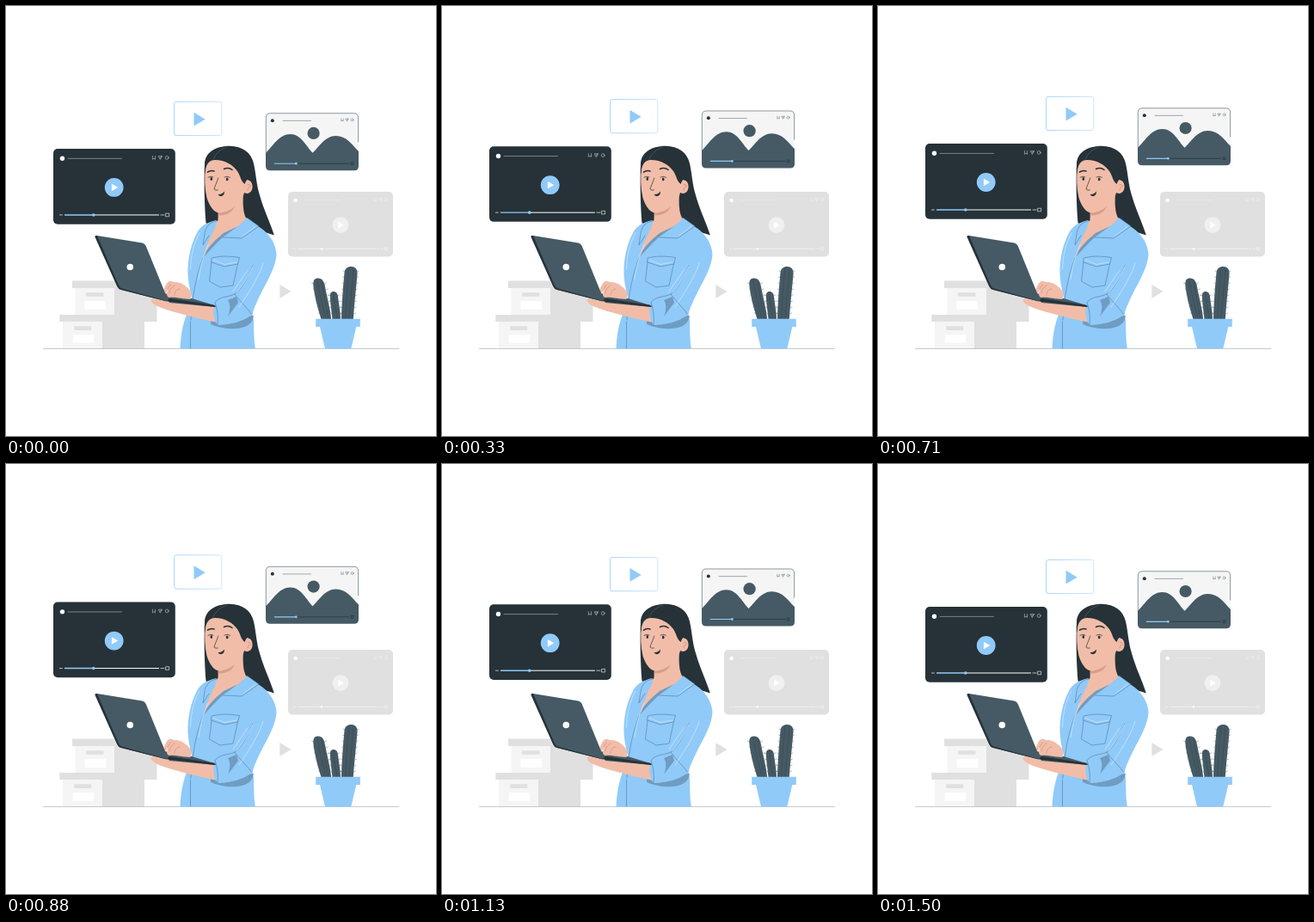
These frames come from a looping animation (500x500 px, 1.54 s). An HTML page:

```html
<!DOCTYPE html>
<html lang="en">
<head>
<meta charset="utf-8">
<title>Floating video cards</title>
<style>
html, body { margin: 0; width: 100%; height: 100%; overflow: hidden; background: #fff; }
svg { display: block; width: 100vw; height: 100vh; }
.ink { fill: #263238; }
.slate { fill: #455a64; }
.sky { fill: #90caf9; }
.grey { fill: #e0e0e0; }
.pale { fill: #f5f5f5; }
.white { fill: #fff; }
.skin { fill: #f1bda8; }
.blush { fill: #d99c88; }
.shade { fill: #6f9cc0; }
.line { fill: none; stroke-linecap: round; stroke-linejoin: round; }
.seam { stroke: #4a7396; stroke-width: .55; }
.crease { stroke: #d3eafd; stroke-width: .7; }
.dark { stroke: #263238; }
.light { stroke: #fff; }
.blue { stroke: #90caf9; }
</style>
</head>
<body>
<svg viewBox="0 0 500 500" stroke-width=".7">
  <defs>
    <linearGradient id="edge" x2="1">
      <stop offset="0" stop-color="#90caf9"/>
      <stop offset="1" stop-color="#c0e0fb"/>
    </linearGradient>
    <g id="icons" class="line" stroke-width=".6">
      <path d="M-1.6-1.9V1.9L0 .8 1.6 1.9V-1.9M5.6-1.7H9.4L7.5 1.8ZM7.5 0 9.4-1.7"/>
      <circle cx="15.2" r="1.9"/>
    </g>
  </defs>

  <!-- grey card and small arrow -->
  <rect class="grey" x="328" y="216" width="122" height="75.5" rx="5"/>
  <circle class="white" cx="336.7" cy="226" r="2.3"/>
  <path class="line" stroke="#ececec" d="M348 225.7H387"/>
  <use href="#icons" stroke="#f3f3f3" transform="translate(429.5 225.2) scale(.82)"/>
  <circle class="pale" cx="389" cy="254.7" r="9.4" opacity=".75"/>
  <path class="white" d="M386.3 250.8V258.6L392.5 254.7Z"/>
  <path class="line" stroke="#f4f4f4" d="M334.5 282.4H336.5M339 282.4H433.5M436 282.4H438.5M441 281H443.5V283.8H441Z"/>
  <circle class="white" cx="367" cy="282.4" r="1.2"/>
  <path class="grey" d="M318.3 324V340L331.5 332Z"/>

  <!-- boxes -->
  <path class="grey" d="M126 328H175.5V359H126ZM77 319.5H178V328H77ZM112 367H161V398.5H112ZM62.3 359H175.5V367H62.3Z"/>
  <path class="pale" d="M80.5 328H126V359H80.5ZM66 367H112V398.5H66Z"/>
  <rect class="grey" x="93" y="333.3" width="20.5" height="4.5" rx="1"/>
  <rect class="grey" x="79.3" y="372.3" width="20" height="4.7" rx="1"/>
  <path class="white" d="M91.5 343H116V353H91.5ZM77.8 382.3H102V391.7H77.8Z"/>

  <path class="line" stroke="#aeb4b7" d="M43.5 398.5H456.5"/>

  <!-- cactus -->
  <g id="cactus">
    <path class="slate" d="M366.5 364C362 350 358.5 336 357.4 325C356.8 319 359 316.3 363 316.6C367.5 317 369.8 320 370.7 325C373 338 377 351 378.2 364Z"/>
    <path class="slate" d="M379.5 364C378.5 354 377 345 376.8 337C376.8 333.5 378.5 331.8 381.2 332C384.5 332.3 385.7 335 386 338C387 347 389 356 389 364Z"/>
    <path class="slate" d="M390 364C390.5 345 392 326 393.5 310C394.2 305 397 303 401.5 303C406.5 303 409 306.5 408.5 312C407 330 404.8 348 403.8 364Z"/>
    <path class="line" stroke="#37474f" stroke-width=".5" d="M362 318C364 334 369 350 372 364M367 318C368 335 373 350 375 364M381 333C381 345 384 356 385 364M399 304C397 325 395 345 395 364M404 304C403 325 400 345 399 364"/>
  </g>
  <path class="sky" d="M360.2 363.7H411.8V373H360.2ZM365 373H407.3L401.3 398.5H371Z"/>

  <!-- hair behind -->
  <path class="ink" d="M231 184C231 171 243 162.8 260 162.7C275 163 285 170 288 183C291 197 291 207 295 220C300 238 307 251 311.8 266.5C300 262 285 260 273 252L247 249C242 254 237 254 232.5 252.5C231 235 230 207 231 184Z"/>

  <!-- neck and face -->
  <path class="skin" d="M247 234L276 217C275 232 276 244 281 249L265 268L246 262Z"/>
  <path class="blush" d="M247 240C257 239 263 235 267 231C264 240 256 244 246.5 243.5Z"/>
  <path class="skin" d="M232 188C234 180 241 175 248 176C260 174 270 181 276 203C279 201 286 202 286.5 209C287 216 282 220 277 217C274 230 260 240 248 240.7C241 240 236 231 233.5 223C231 212 230.5 199 232 188Z"/>
  <path class="ink" d="M231.3 196C232 184 236 179 243 179C255 179 264 185 269 192C273 198 273 204 277.8 207C279 201 283 199 287 205C286 181 279 165 260 163C240 164 229 174 231.3 196Z"/>
  <path class="line" stroke="#64737a" stroke-width=".5" d="M241 178C244 171 250 166 257 164"/>
  <path class="line dark" stroke-width="1.6" d="M234.5 193.2Q238 190.5 242 192M253.5 189.5Q259 187.2 263 190.5"/>
  <ellipse class="ink" cx="238.8" cy="201" rx="1.3" ry="1.9"/>
  <ellipse class="ink" cx="257.2" cy="201.4" rx="1.3" ry="1.9"/>
  <path class="line dark" d="M235 199.2Q238 197.2 241 199M254 199Q257 197.2 260.5 199.2M246.8 200C245 206 242.5 210 242 213Q243.7 215 246.3 214"/>
  <path class="ink" d="M246.5 219Q251.5 219 254 215.4Q254 221 249.5 221.2Q247.5 220.8 246.5 219Z"/>
  <path class="line" stroke="#b56d5d" stroke-width=".5" d="M281 208Q284 206 284 210Q281 211 281 214"/>

  <!-- shirt -->
  <path class="sky" d="M246 250C237 250 228 254 223 262C215 276 211 294 211.5 312C212 325 216 337 217 345C209 358 204 372 202.5 398.5H290C288 388 288.5 380 288 365C285 360 288 352 291 346C300 325 314 306 314.5 288C313 273 304 262 290 254L281 247L262 262Z"/>
  <path class="skin" d="M245.5 250L262 247L270 256C258 263 242 277 229 292C233 278 240 266 245.5 250Z"/>
  <path class="shade" d="M270 256L252 269C243 277 235 286 229 293C233 282 242 273 253 264Z"/>
  <path class="sky" d="M280 246L294 256L274 270L252 269C263 262 274 256 280 246Z"/>
  <path class="sky" d="M245 249C238 250 233 253 229 262L226 278L243 259Z"/>
  <path class="line seam" d="M280 246L294 256L274 270L252 269M245 250C238 251 233 255 231 264L229 278L236 267M229 293C222 312 217 332 215 365"/>
  <path class="line crease" d="M276 267L290 256.5M225 264C218 276 215 290 214.5 306M235 278C231 288 226 300 224 318"/>
  <path class="line seam" d="M239.5 293C250 290 262 291 271.5 292.5L269.5 300L254 303L239 298ZM239 298L236.5 320L249 327L264 325L269.5 300"/>
  <path class="line crease" d="M241 295.2L254 300.5L268 298"/>

  <!-- shadow below the arm -->
  <path class="shade" d="M238 366L288 360C287 369 280 374 268 375C258 376 247 374 238 370Z"/>
  <path class="line seam" d="M214.5 367V398"/>

  <!-- forearm and cuff -->
  <path class="skin" d="M168.5 341C174 339 181 343 192 344L245 349L244 367.5C222 363 193 356 177 349.5C171 347 169 345 168.5 341Z"/>
  <path class="sky" d="M243 345C247 338 256 338 263 336C275 330 279 315 287 303L307 312C297 329 290 344 285 359C279 366 260 371 246 371C240 363 241 352 243 345Z"/>
  <path class="shade" d="M268 338L270 345L258 361C261 354 261 346 258 342Z"/>
  <path class="line seam" d="M287 302C281 314 276 328 266 335C258 339 248 337 243 345C246 353 247 363 246 371M266 335C273 345 281 351 285 358"/>
  <path class="line crease" d="M287 303C280 317 274 327 268 333M299 299C294 316 281 335 271 350M281 307L264 332"/>

  <!-- laptop and hand -->
  <path class="slate" d="M188 342L184 334L216 340L244 348.5L243.5 350L190 345Z"/>
  <path class="skin" d="M183 331C185 326 187 321 190 320C193 319 195 322 198 321C206 322 213 328 215.5 334L214.5 341C206 341 196 338 190 339C186 338 187 334 188 330L185 335Q182 334 183 331Z"/>
  <path class="line" stroke="#c27c69" stroke-width=".5" d="M190 334C190 329 194 326 196 325M196 336C196 332 199 329 202 329M188 329L191 324"/>
  <path class="slate" d="M106 267L158.5 275.4Q161.5 276 162.7 279L188 341Q189 344 186 343.2L134 330Q130.5 329 129.3 326L103.8 269Q102.6 266.4 106 267Z"/>
  <path class="ink" d="M103.8 269L129.3 326Q130.5 329 134 330L186 343.2L243.5 350L242 347.7L190 340L187 343L135 328.5Q132 328 131 325L106 267Q103 266.5 103.8 269Z"/>
  <circle class="white" cx="144.3" cy="303.5" r="3.8"/>

  <g id="cards">
    <!-- dark player -->
    <rect class="ink" x="55" y="166" width="141.8" height="87.7" rx="5"/>
    <circle class="white" cx="65.5" cy="177.3" r="2.7"/>
    <path class="line" stroke="#9da4a7" d="M72 177.4H134.5"/>
    <use href="#icons" stroke="#c8cdd0" x="172" y="176.4"/>
    <circle class="sky" cx="125.7" cy="211" r="10.9"/>
    <path class="white" d="M122.9 206.8V215.2L130.3 211Z"/>
    <path class="line light" stroke-width="1" d="M102 243H177.5"/>
    <path class="line blue" stroke-width="1.4" d="M68.5 243H102"/>
    <circle class="sky" cx="101.8" cy="243" r="1.8"/>
    <path class="line" stroke="#bcc3c6" stroke-width="1" stroke-dasharray="1 .8" d="M62.5 243H66M180 243H184"/>
    <path class="line light" stroke-width=".6" d="M186 241.2H189.6V244.8H186Z"/>

    <!-- outlined card -->
    <rect x="195.6" y="111.4" width="55.2" height="39.2" rx="2.5" fill="#fff" stroke="url(#edge)" stroke-width=".8"/>
    <path class="sky" d="M218.5 123.8V139.6L231.7 131.7Z"/>

    <!-- landscape card -->
    <rect class="pale" x="302" y="124.5" width="107.9" height="66.8" rx="5"/>
    <path class="line" stroke="#455a64" stroke-width=".6" d="M302.3 171V129.8Q302.3 124.8 307.3 124.8H404.6Q409.6 124.8 409.6 129.8V158"/>
    <path class="slate" d="M302 171C311 162 318 149 330.5 149C343 149 349 163 356.5 170.8C364 164 371 151 383.5 151C396 151 402 161 410 169V186.3Q410 191.3 405 191.3H307Q302 191.3 302 186.3Z"/>
    <circle class="slate" cx="357.6" cy="148" r="7.1"/>
    <circle class="ink" cx="309.8" cy="133.2" r="2"/>
    <path class="line" stroke="#7b898f" d="M322 133.4H354.5"/>
    <use href="#icons" stroke="#455a64" transform="translate(391 132.5) scale(.76)"/>
    <path class="line dark" d="M337 183.3H398.5M401.5 182H404V184.6H401.5Z"/>
    <path class="line blue" stroke-width="1.2" d="M312.3 183.3H337"/>
    <circle class="sky" cx="337.3" cy="183.3" r="1.4"/>
  </g>
</svg>
<script>
const LOOP = 1540, LIFT = 6, LEAD = 40;
const cards = document.getElementById('cards');
const cactus = document.getElementById('cactus');

// Spines along both edges of a leaning stem.
function spines(x0, y0, x1, y1, half, count) {
  let d = '';
  for (let i = 0; i < count; i++) {
    const k = i / (count - 1);
    const x = x0 + (x1 - x0) * k, y = y0 + (y1 - y0) * k;
    for (const side of [-1, 1]) d += `M${x + side * half} ${y}l${side * 2} -1`;
  }
  const path = document.createElementNS('http://www.w3.org/2000/svg', 'path');
  path.setAttribute('d', d);
  path.setAttribute('class', 'line');
  path.setAttribute('stroke', '#5d6e77');
  path.setAttribute('stroke-width', .5);
  cactus.append(path);
}
spines(364, 323, 372, 358, 6.5, 6);
spines(381.5, 337, 384, 358, 4, 4);
spines(401, 309, 397.5, 358, 7, 8);

function draw(now) {
  const phase = 2 * Math.PI * ((now % LOOP) + LEAD) / LOOP;
  const y = -LIFT / 2 * (1 - Math.cos(phase));
  cards.setAttribute('transform', `translate(0 ${y.toFixed(3)})`);
}

const start = performance.now();
function tick() {
  draw(performance.now() - start);
  requestAnimationFrame(tick);
}
draw(0);
requestAnimationFrame(tick);
</script>
</body>
</html>
```
